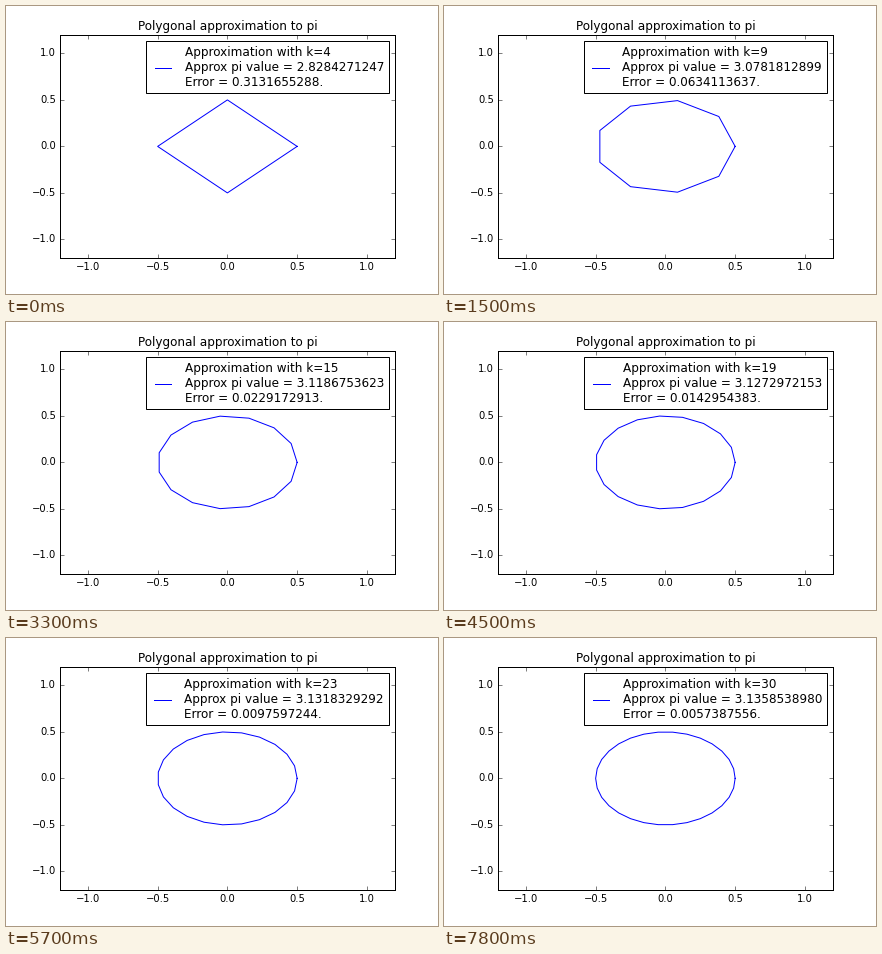
Recreate the animation shown at these times as a matplotlib script. Size 432 by 288 pixels, loop 8000 ms.

```python
import numpy as np
import matplotlib.pyplot as plt
from matplotlib.animation import FuncAnimation

plt.style.use("classic")
plt.rcParams.update({
    "figure.dpi": 72,
    "savefig.dpi": "figure",
    "figure.facecolor": "white",
    "savefig.facecolor": "white",
    "figure.subplot.bottom": 0.125,
    "font.family": "DejaVu Sans",
    "font.size": 10,
})

INTERVAL = 100        # ms per tick
TICKS = 80            # 8 s loop
TICKS_PER_STEP = 3    # one more side every 300 ms
FIRST_K = 4
RADIUS = 0.5


def polygon(k):
    angles = np.linspace(0, 2 * np.pi, k + 1)
    return RADIUS * np.cos(angles), RADIUS * np.sin(angles)


def caption(k):
    approx = k * np.sin(np.pi / k)
    return (f"Approximation with k={k}\n"
            f"Approx pi value = {approx:.10f}\n"
            f"Error = {np.pi - approx:.10f}.")


fig, ax = plt.subplots(figsize=(6, 4))
ax.set_title("Polygonal approximation to pi")
ax.set(xlim=(-1.2, 1.2), ylim=(-1.2, 1.2))
ticks = np.arange(-1, 1.1, 0.5)
ax.set_xticks(ticks)
ax.set_yticks(ticks)

line, = ax.plot(*polygon(FIRST_K), color="blue", label=caption(FIRST_K))
label = ax.legend(loc="upper right").get_texts()[0]


def update(tick):
    k = FIRST_K + tick // TICKS_PER_STEP
    line.set_data(*polygon(k))
    label.set_text(caption(k))
    return line, label


anim = FuncAnimation(fig, update, frames=TICKS, interval=INTERVAL,
                     repeat=True, repeat_delay=0, blit=False)
plt.show()
```
